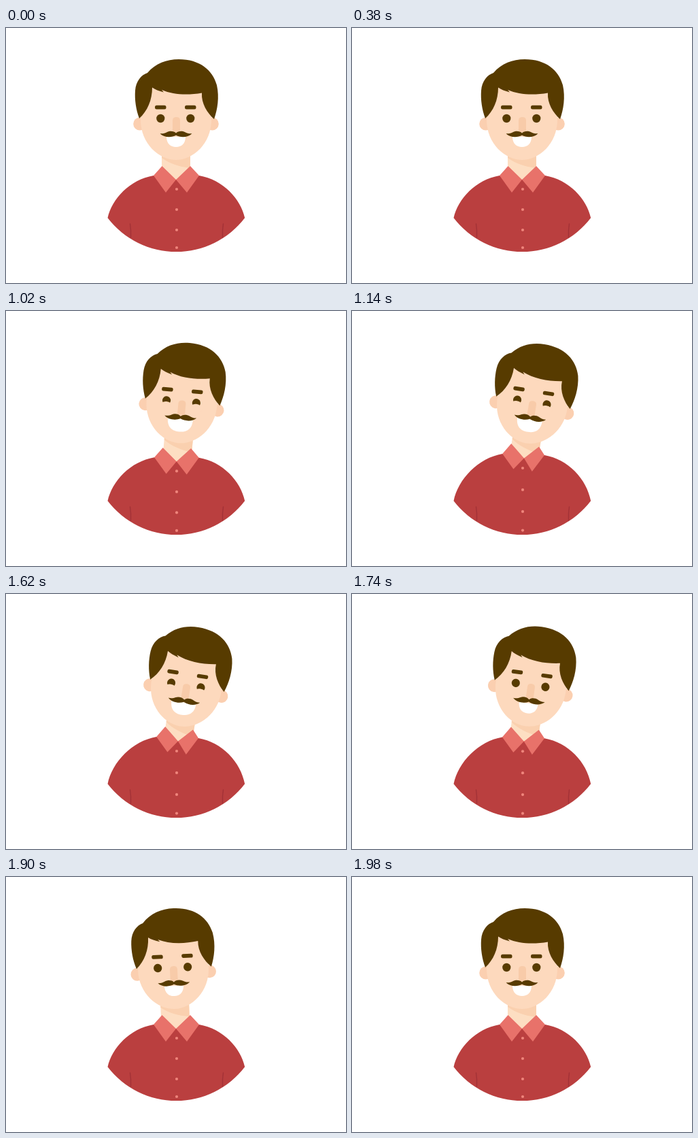
Animation of 500 by 375 pixels, one loop 2400 ms. Source, as an HTML page:

```html
<!DOCTYPE html>
<html lang="en">
<head>
<meta charset="utf-8">
<title>Nodding man</title>
<style>
  html, body { margin: 0; width: 100%; height: 100%; overflow: hidden; background: #fff; }
  svg { display: block; width: 100vw; height: 100vh; }
</style>
</head>
<body>
<svg viewBox="0 0 500 375">
  <g id="neck">
    <path d="M229 172H271V226H229Z" fill="#fddec2"/>
    <path d="M229 172H271V206C254 204 240 199 229 191Z" fill="#fad0af"/>
  </g>

  <path id="shirt" fill="#ba3f3f"/>
  <g fill="none" stroke="#a23237" stroke-width="1.4" stroke-linecap="round">
    <path d="M182.5 288Q184 297 183.5 308"/>
    <path d="M319.5 288Q318 297 318.5 308"/>
  </g>
  <path id="collar" fill="#e8726a"/>
  <g id="buttons" fill="#ef857c"></g>

  <g id="head">
    <g fill="#fbcfb0">
      <circle cx="196.7" cy="141" r="9.5"/>
      <circle cx="303.3" cy="141" r="9.5"/>
    </g>
    <path d="M198 85V135C198 170 225 194 250 194S302 170 302 135V85Z" fill="#fdd9bd"/>
    <path d="M245 153V136Q245 131 250.500 131T256 136V153Z" fill="#f8cba9"/>
    <g id="eyes"></g>
    <g fill="#573b00">
      <rect x="219" y="113.800" width="16.500" height="5.700" rx="2.500"/>
      <rect x="263" y="113.800" width="16.500" height="5.700" rx="2.500"/>
      <path d="M196 133C191 120 189 105 190 92C191 78 199 69 208 66C220 52 236 46 254 46C285 46 304 62 310 84C314 102 311 120 306 134C296 125 287 111 288 95.500C268 99 246 98.500 229 91L232 94.500C225 92.500 219 90.500 215 87.500C215 106 208 122 196 133Z"/>
    </g>
    <path id="mouth" fill="#fff"/>
    <path d="M250 154.500C253 151.300 259 151 263 153C266 154.800 270 155.800 273.500 155.200C268 161 257 161.500 250 157.800C243 161.500 232 161 226.500 155.200C230 155.800 234 154.800 237 153C241 151 247 151.300 250 154.500Z" fill="#573b00"/>
  </g>
</svg>

<script>
const LOOP = 2400, STEP = 20, TILT = 9, RECOIL = -3.2;
const NS = 'http://www.w3.org/2000/svg';
const el = id => document.getElementById(id);
const clamp = v => Math.max(0, Math.min(1, v));
const mix = (a, b, p) => a + (b - a) * p;
const set = (node, attrs) => {
  for (const key in attrs) node.setAttribute(key, attrs[key]);
};
const add = (parent, name, attrs) => {
  const node = parent.appendChild(document.createElementNS(NS, name));
  set(node, attrs);
  return node;
};
const ease = (t, start, end) => {
  const p = clamp((t - start) / (end - start));
  return p * p * (3 - 2 * p);
};

const buttonRows = [237, 267, 297, 323];
const buttons = buttonRows.map(() => add(el('buttons'), 'circle', { cx: 251, r: 2.1 }));

// Collar corners as [x, y, raised x, raised y].
const collar = {
  topL: [229.5, 203, 234.2, 195],
  outL: [217, 217, 221.2, 210],
  tipL: [235, 242, 237.4, 232.5],
  notch: [250, 223, 253, 216.5],
  topR: [271, 203, 275, 199.5],
  outR: [284, 217, 283, 212],
  tipR: [266, 242, 264.8, 236]
};

// Each eye is a disc covered from below by a rising cheek.
const eyes = [227.3, 271.3].map(x => {
  const group = add(el('eyes'), 'g', { transform: `translate(${x} 133)` });
  return {
    ball: add(group, 'ellipse', { rx: 6.1, fill: '#573b00' }),
    cheek: add(group, 'ellipse', { rx: 9, ry: 7, fill: '#fdd9bd' })
  };
});

function drawShirt(lift) {
  const at = ([x, y, x2, y2]) => [mix(x, x2, lift), mix(y, y2, lift)];
  const line = (...names) => names.map(n => at(collar[n]).join(' ')).join('L');
  const [lx, ly] = at(collar.outL), [rx, ry] = at(collar.outR);
  const armY = 251 - 4 * lift;
  set(el('shirt'), {
    d: `M149.5 279.3C156 ${armY} ${lx - 35} ${ly + 6} ${line('outL', 'notch', 'outR')}` +
       `C${rx + 35} ${ry + 6} 345 ${armY} 351.2 279.3A127 127 0 0 1 149.5 279.3Z`
  });
  set(el('collar'), {
    d: `M${line('topL', 'outL', 'tipL', 'notch')}ZM${line('topR', 'outR', 'tipR', 'notch')}Z`
  });
  buttons.forEach((b, i) => {
    const y = buttonRows[i];
    set(b, { cy: y - 6 * lift * (329 - y) / 92 });
  });
}

function drawFace(joy, blink) {
  for (const { ball, cheek } of eyes) {
    set(ball, { ry: mix(6.2, 0.7, blink) });
    set(cheek, { cy: mix(14, 8.6, joy) });
  }
  const w = mix(14, 18.5, joy), top = mix(160, 158.5, joy), low = mix(175, 177.2, joy);
  set(el('mouth'), {
    d: `M${250 - w} ${top}H${250 + w}C${250 + w} ${low - 5} ${250 + w * 0.57} ${low} 250 ${low}` +
       `S${250 - w} ${low - 5} ${250 - w} ${top}Z`
  });
}

function draw(ms) {
  const t = Math.floor((ms % LOOP) / STEP) * STEP;
  const blink = clamp(Math.min(t - 240, 380 - t) / 60);
  const joy = ease(t, 880, 1000) - ease(t, 1600, 1720);
  const lift = ease(t, 960, 1140) - ease(t, 1720, 1860);
  const tilt = TILT * ease(t, 880, 1140)
    + (RECOIL - TILT) * ease(t, 1710, 1860)
    - RECOIL * ease(t, 1860, 1980);

  const pose = { transform: `rotate(${tilt} 250 232)` };
  set(el('neck'), pose);
  set(el('head'), pose);
  drawShirt(lift);
  drawFace(joy, blink);
}

const begin = performance.now();
function tick() {
  draw(performance.now() - begin);
  requestAnimationFrame(tick);
}
tick();
</script>
</body>
</html>
```
